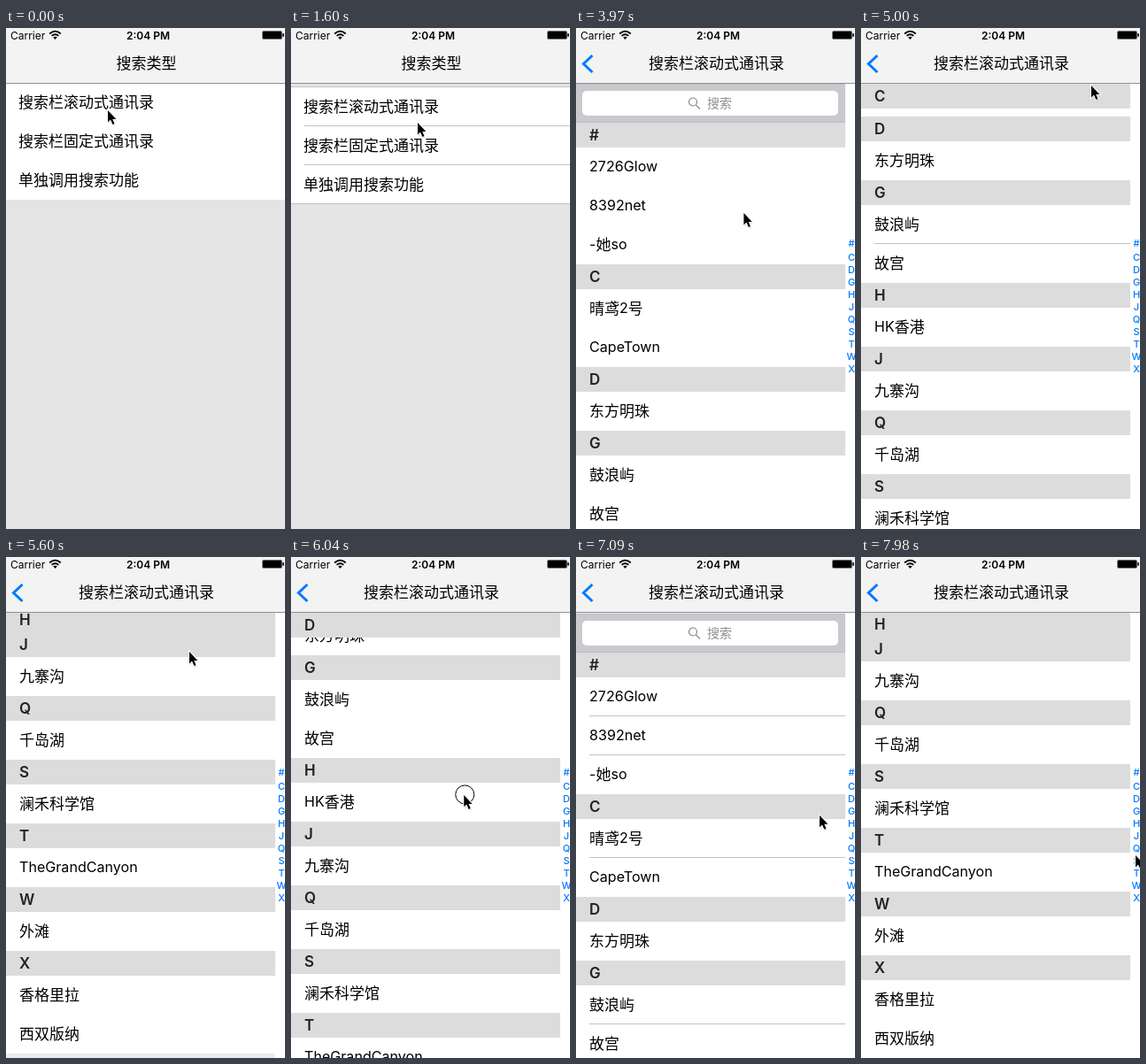
An HTML page that plays this animation: 315x566 px, repeating every 8 s.

```html
<!DOCTYPE html>
<html lang="zh-CN">
<head>
<meta charset="utf-8">
<title>搜索类型</title>
<style>
html, body { margin: 0; width: 100%; height: 100%; overflow: hidden; }
body { position: relative; background: #e4e4e4; color: #000; font: 17px Inter, "Noto Sans CJK SC", "Noto Sans CJK", sans-serif; }
body div, body svg { position: absolute; white-space: nowrap; }
i { position: relative; top: -1px; font-style: normal; font-size: 16.1px; }

#stage { left: 0; top: 0; width: 315px; height: 566px; overflow: hidden; background: #e4e4e4; }
#nav { width: 315px; height: 62px; background: #f3f3f3; border-bottom: 1px solid #929292; }
.title { left: 1px; top: 28px; width: 315px; line-height: 25px; text-align: center; font-weight: 500; }
#carrier { left: 5px; top: 1px; font-size: 12px; line-height: 15px; }
#clock { left: 136px; top: 1px; font-size: 12px; line-height: 15px; font-weight: 600; }

.row { height: 44px; line-height: 44px; text-indent: 15px; width: 100%; background: #fff; }
.lines .row.ruled::after { content: ""; position: absolute; left: 15px; right: 0; bottom: 0; height: 1px; background: #c3c3c3; }
#menu { width: 315px; height: 566px; background: #e4e4e4; }
#menu .row { text-indent: 14px; }
#table { top: 62px; width: 315px; height: 132px; }
#table.lines { box-shadow: 0 -1px #c3c3c3; }
#table.lines .row:last-child::after { left: 0; }
#table .pressed { background: #d9d9d9; }

#list { top: 63px; width: 315px; height: 503px; background: #fff; overflow: hidden; }
#view { width: 304px; height: 503px; background: #ebebef; overflow: hidden; }
#content { width: 304px; background: #fff; }
#search { width: 304px; height: 44px; background: #c9c9ce; box-shadow: inset 0 1px #bdbdc2, inset 0 -1px #bdbdc2; }
#field { left: 7px; top: 8px; width: 289px; height: 28px; border-radius: 5px; background: #fff; }
#field div { left: 141px; font-size: 14px; line-height: 28px; color: #8e8e93; }
#field svg { left: 119px; top: 7px; }
.head { width: 304px; height: 28px; line-height: 28px; text-indent: 15px; background: #dcdcdc; color: #222; font-weight: 600; z-index: 1; }
.key { left: 301px; width: 20px; line-height: 14px; text-align: center; font-size: 11px; font-weight: 500; color: #007aff; }
#cursor { left: 0; top: 0; overflow: visible; }
</style>
</head>
<body>
<div id="stage">
  <div id="menu"><div id="table"></div></div>
  <div id="list">
    <div id="view"><div id="content">
      <div id="search"><div id="field">
        <svg width="16" height="16" fill="none" stroke="#85858a" stroke-width="1.2"><circle cx="6" cy="5.5" r="4.5"/><path d="M9.3 8.8L14 13.5"/></svg>
        <div>搜索</div>
      </div></div>
    </div></div>
  </div>
  <div id="nav">
    <div id="carrier">Carrier</div>
    <svg style="left:48px;top:2px" width="15" height="12" fill="none" stroke="#000" stroke-width="1.8">
      <path d="M1.2 4.5Q7.5-1.2 13.8 4.5M3.6 6.9Q7.5 3.5 11.4 6.9"/><path d="M5.2 8.6Q7.5 6.7 9.8 8.6L7.5 11Z" fill="#000" stroke="none"/>
    </svg>
    <div id="clock">2:04 PM</div>
    <svg style="left:289px;top:3px" width="26" height="11"><rect x=".5" y=".5" width="22" height="9" rx="1.5" stroke="#777"/><rect x="23.2" y="3" width="1.6" height="4" rx=".8"/></svg>
    <div class="title" id="menuTitle">搜索类型</div>
    <div class="title" id="listTitle">搜索栏滚动式通讯录</div>
    <svg id="back" style="left:5px;top:28px" width="18" height="25" fill="none" stroke="#007aff" stroke-width="3"><path d="M13.5 3L3.5 12.5L13.5 22"/></svg>
  </div>
  <svg id="cursor" width="1" height="1">
    <circle id="ring" cx="1" cy="-.5" r="10.5" fill="none" stroke="#000"/>
    <path d="M1 1V15L4 12L6.4 17.5L8.6 16.5L6.3 11.4H10.5Z" opacity=".2"/>
    <path d="M0 0V13.4L3 10.6L5.4 16L7.5 15L5.3 10H9.4Z" stroke="#fff" stroke-width="2" paint-order="stroke"/>
  </svg>
</div>
<script>
const $ = id => document.getElementById(id);
const ROW = 44, HEAD = 28, WIDTH = 315, LOOP = 8000, STEP = 148, BOUNCE = 138;

const menuItems = ["搜索栏滚动式通讯录", "搜索栏固定式通讯录", "单独调用搜索功能"];
const sections = {
  "#": ["2726Glow", "8392net", "-她so"],
  C: ["晴鸢2号", "CapeTown"],
  D: ["东方明珠"],
  G: ["鼓浪屿", "故宫"],
  H: ["HK香港"],
  J: ["九寨沟"],
  Q: ["千岛湖"],
  S: ["澜禾科学馆"],
  T: ["TheGrandCanyon"],
  W: ["外滩"],
  X: ["香格里拉", "西双版纳"]
};

function add(parent, className, top, text) {
  const el = document.createElement("div");
  el.className = className;
  el.style.top = top + "px";
  el.innerHTML = className.startsWith("row") ? text.replace(/[ -~]+/g, "<i>$&</i>") : text;
  parent.append(el);
  return el;
}

const menuRows = menuItems.map((text, i) => add($("table"), "row ruled", i * ROW, text));

let bottom = ROW;
const heads = Object.entries(sections).map(([key, names], i) => {
  const top = bottom, el = add($("content"), "head", top, key);
  bottom += HEAD;
  names.forEach((name, n) => {
    add($("content"), n < names.length - 1 ? "row ruled" : "row", bottom, name);
    bottom += ROW;
  });
  add($("list"), "key", (i ? 175 : 173) + i * 14, key);
  return { el, top };
});
$("content").style.height = bottom + "px";
const scrollEnd = bottom - 503;

// The picture advances in even steps within each active span and rests between them.
const spans = [[150, 450], [750, 1750], [1890, 2180], [3380, 4410], [4560, 5600], [5750, 6790], [6940, 7230], [7530, 7980]];
const steps = [0, ...spans.flatMap(([from, to]) => {
  const count = Math.round((to - from) / STEP);
  return Array.from({ length: count + 1 }, (_, i) => Math.floor((from + (to - from) * i / count) / 10) * 10);
})];

// Time, x and y of the places where the pointer turns.
const turns = [
  [0, 115, 93], [600, 109, 87], [1180, 140, 301], [1600, 143, 107], [2180, 116, 82], [3530, 116, 82],
  [4410, 268, 345], [5000, 260, 65], [5600, 207, 107], [6190, 193, 300], [6490, 191, 223], [7230, 285, 300], [7980, 310, 337]
];
const presses = [[750, 1180], [3380, 3500], [4560, 4900], [5750, 6200], [7680, 7900]];

const clamp = v => Math.max(0, Math.min(1, v));
const smooth = u => u * u * (3 - 2 * u);
const halfPixel = v => Math.round(v * 2) / 2;
const move = (el, x, y) => { el.style.transform = `translate(${x}px, ${y}px)`; };

function pointerAt(t) {
  const i = Math.max(1, turns.findIndex(([time]) => time >= t));
  const [t0, x0, y0] = turns[i - 1], [t1, x1, y1] = turns[i];
  const f = smooth((t - t0) / (t1 - t0));
  return [x0 + (x1 - x0) * f, y0 + (y1 - y0) * f];
}

// Speeds up past the limit until release, then springs back to it.
function flick(t, { start, release, from, to, over, power }) {
  if (t > release) return to + over * Math.exp((release - t) / BOUNCE);
  return from + (to + over - from) * clamp((t - start) / (release - start)) ** power;
}

const pull = { start: 600, release: 1180, from: 0, to: 0, over: 95, power: 1.3 };
const scrollDown = { start: 4410, release: 5300, from: 0, to: scrollEnd, over: 44, power: 1.811 };
const scrollUp = { start: 5750, release: 6340, from: scrollEnd, to: 0, over: -53.4, power: 1.5 };

function scrollAt(t) {
  if (t >= 7680) return scrollEnd;
  return flick(t, t > scrollUp.start ? scrollUp : scrollDown);
}

// Hairlines only show when the offset falls between whole pixels.
function place(el, offset) {
  move(el, 0, Math.round(offset));
  el.classList.toggle("lines", offset % 1 !== 0);
}

function draw(t) {
  move($("cursor"), ...pointerAt(t));
  $("ring").style.display = presses.some(([from, to]) => t >= from && t < to) ? "" : "none";

  place($("table"), halfPixel(flick(t, pull)));
  menuRows[0].classList.toggle("pressed", t >= 3520);

  const scroll = halfPixel(scrollAt(t));
  place($("content"), -scroll);
  heads.forEach(({ el, top }, i) => {
    const limit = (heads[i + 1]?.top ?? bottom) - HEAD;
    el.style.top = Math.max(top, Math.min(Math.floor(scroll), limit)) + "px";
  });

  const p = 1 - (1 - clamp((t - 3530) / 440)) ** 3;
  move($("menu"), -WIDTH * 0.3 * p, 0);
  move($("list"), WIDTH * (1 - p), 0);
  move($("menuTitle"), -120 * p, 0);
  move($("listTitle"), 150 * (1 - p), 0);
  $("menuTitle").style.opacity = 1 - p;
  $("listTitle").style.opacity = $("back").style.opacity = p;
}

let shown = -1;
function tick(now) {
  const t = now % LOOP;
  const step = steps.filter(start => start <= t).pop();
  if (step !== shown) draw(shown = step);
  requestAnimationFrame(tick);
}
draw(shown = 0);
requestAnimationFrame(tick);
</script>
</body>
</html>
```
